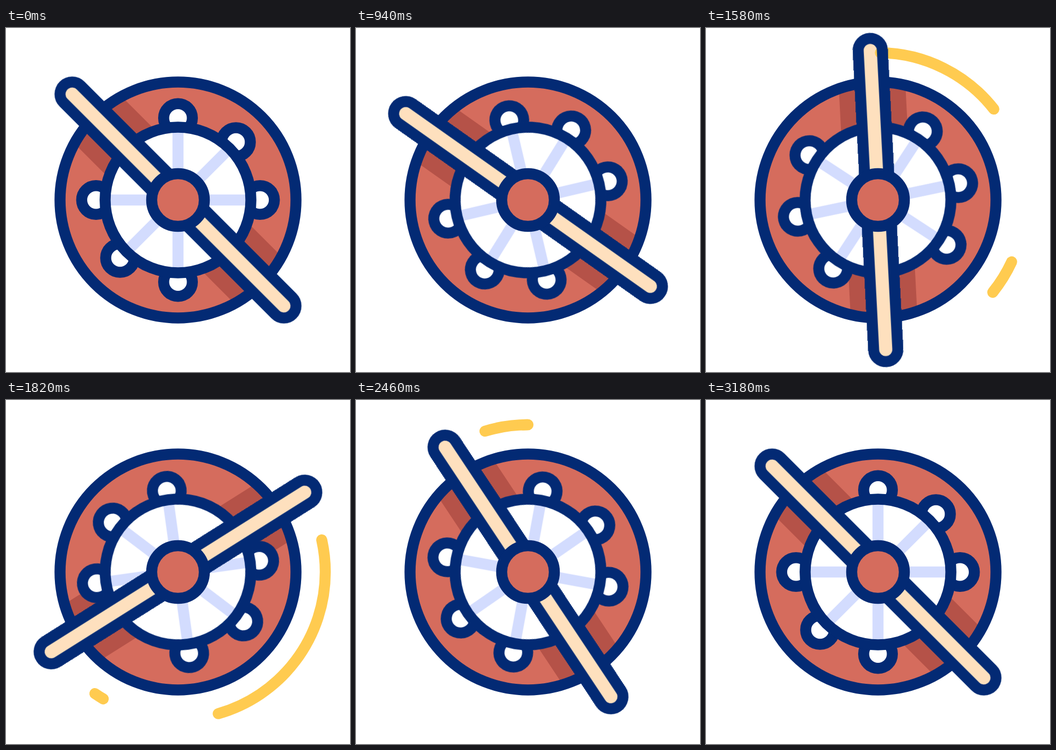
An HTML page without scripts that plays this animation: 640 px wide and 640 px high, repeating every 3600 ms.

```html
<!DOCTYPE html>
<html lang="en">
<head>
<meta charset="utf-8">
<title>Spinning drum</title>
<style>
@property --from { syntax: "<length>"; inherits: false; initial-value: 0px; }
@property --to { syntax: "<length>"; inherits: false; initial-value: 0px; }

html, body { margin: 0; width: 100%; height: 100%; overflow: hidden; background: #fff; }
svg { display: block; width: 100%; height: 100%; }

.line { stroke: #032a74; stroke-width: 20.5; }
.none { fill: none; }
.red { fill: #d56c5d; }
.dark { fill: #b55248; }
.cream { fill: #fee0be; }
.white { fill: #fff; }
.spokes { stroke: #d3dcfe; stroke-width: 20.5; }

.stick { animation: stick 3.6s infinite; }
.wheel { animation: wheel 3.6s infinite; }

/* wind up, swing half a turn past the end, settle */
@keyframes stick {
  0% { transform: rotate(-45deg); animation-timing-function: cubic-bezier(.333, 0, .667, 1); }
  15% { transform: rotate(-60deg); animation-timing-function: cubic-bezier(.87, 0, .59, 1); }
  66.111% { transform: rotate(147deg); animation-timing-function: cubic-bezier(.333, 0, .667, 1); }
  82.778%, 100% { transform: rotate(135deg); }
}
@keyframes wheel {
  0%, 5.556% { transform: rotate(0deg); animation-timing-function: cubic-bezier(.333, 0, .667, 1); }
  20.556% { transform: rotate(-15deg); animation-timing-function: cubic-bezier(.705, 0, .564, 1); }
  71.667% { transform: rotate(192deg); animation-timing-function: cubic-bezier(.333, 0, .667, 1); }
  88.333%, 100% { transform: rotate(180deg); }
}

/* each trail is the part of the circle between two moving ends, in degrees */
.trail {
  fill: none;
  stroke: #ffcb50;
  stroke-width: 20.5;
  stroke-linecap: round;
  stroke-dasharray: max(.01px, var(--to) - var(--from)) 999px;
  stroke-dashoffset: calc(-1 * var(--from));
}
.long { animation: long-to 3.6s infinite, long-from 3.6s infinite, long-show 3.6s step-end infinite; }
.short { animation: short-to 3.6s infinite, short-from 3.6s infinite, short-show 3.6s step-end infinite; }

@keyframes long-to {
  0%, 38.333% { --to: 0px; animation-timing-function: cubic-bezier(.22, 0, .596, 1); }
  68.889%, 100% { --to: 360px; }
}
@keyframes long-from {
  0%, 43.333% { --from: 0px; animation-timing-function: cubic-bezier(.22, 0, .676, 1); }
  72.222%, 100% { --from: 360px; }
}
@keyframes long-show {
  0%, 72.222%, 100% { stroke-opacity: 0; }
  38.5% { stroke-opacity: 1; }
}
@keyframes short-to {
  0%, 30.556% { --to: 0px; animation-timing-function: cubic-bezier(.2, 0, .737, 1); }
  66.944%, 100% { --to: 360px; }
}
@keyframes short-from {
  0%, 32.222% { --from: 0px; animation-timing-function: cubic-bezier(.238, 0, .554, 1); }
  70.556%, 100% { --from: 360px; }
}
@keyframes short-show {
  0%, 70.556%, 100% { stroke-opacity: 0; }
  30.7% { stroke-opacity: 1; }
}
</style>
</head>
<body>
<svg viewBox="-320 -320 640 640">
  <defs>
    <clipPath id="rim"><circle r="219.5"/></clipPath>
    <rect id="bar" x="-22.5" y="-301.1" width="45" height="602.2" rx="22.5"/>
    <circle id="bell" cy="-152.5" r="26.7"/>
    <g id="bells">
      <use href="#bell"/>
      <use href="#bell" transform="rotate(45)"/>
      <use href="#bell" transform="rotate(90)"/>
    </g>
    <path id="orbit" d="M0-274A274 274 0 0 1 0 274A274 274 0 0 1 0-274" pathLength="360"/>
  </defs>

  <circle class="red" r="219.5"/>
  <g clip-path="url(#rim)">
    <rect class="dark stick" x="-62" y="-230" width="124" height="460"/>
  </g>
  <circle class="line none" r="219.5"/>

  <g class="wheel">
    <g class="line white">
      <use href="#bells"/>
      <use href="#bells" transform="rotate(180)"/>
    </g>
    <circle class="white" r="135.6"/>
    <path class="spokes" d="M0-130V130M-130 0H130M-92 92L92-92"/>
    <circle class="line none" r="135.6"/>
  </g>

  <use class="cream stick" href="#bar"/>
  <use class="trail long" href="#orbit"/>
  <use class="trail short" href="#orbit"/>
  <use class="line none stick" href="#bar"/>
  <circle class="line red" r="49"/>
</svg>
</body>
</html>
```
